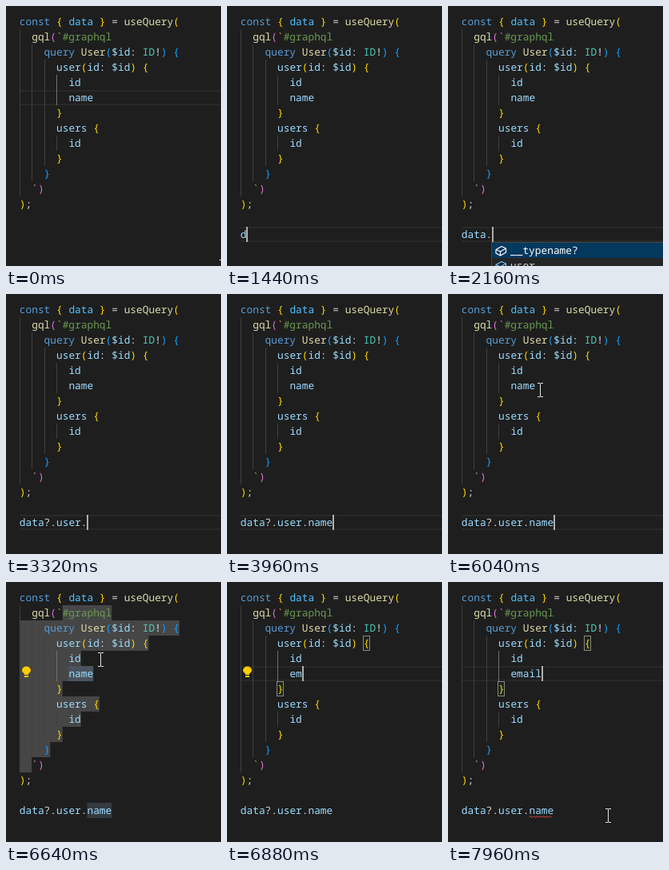
Recreate the animation shown at these times as an HTML page. Size 269 by 325 pixels, loop 8 s.

```html
<!DOCTYPE html>
<html lang="en">
<head>
<meta charset="utf-8">
<title>Typed query editor</title>
<style>
  html, body { margin: 0; width: 100%; height: 100%; overflow: hidden; background: #1e1e1e; }
  svg { display: block; width: 269px; height: 325px; }
  text { font: 12.83px "Noto Sans Mono", "DejaVu Sans Mono", monospace; white-space: pre; text-rendering: geometricPrecision; }
</style>
</head>
<body>
<svg id="stage" viewBox="0 0 269 325"></svg>
<script>
const LOOP = 8000, TICK = 40;
const LEFT = 16.8, TOP = 10, CHAR = 7.698, LINE = 19;
const color = {
  kw: '#569cd6', fn: '#dcdcaa', id: '#9cdcfe', con: '#4fc1ff', type: '#4ec9b0',
  str: '#ce9178', com: '#6a9955', op: '#d4d4d4',
  b1: '#ffd700', b2: '#da70d6', b3: '#179fff'
};

// Each line: indent, then pairs of colour and text
const code = [
  [0, 'kw', 'const ', 'b1', '{ ', 'con', 'data', 'b1', ' } ', 'op', '= ', 'fn', 'useQuery', 'b1', '('],
  [2, 'fn', 'gql', 'b2', '(', 'str', '`', 'com', '#graphql'],
  [4, 'kw', 'query ', 'fn', 'User', 'b3', '(', 'id', '$id', 'op', ': ', 'type', 'ID', 'op', '!', 'b3', ') {'],
  [6, 'id', 'user', 'b1', '(', 'id', 'id', 'op', ': ', 'id', '$id', 'b1', ') {'],
  [8, 'id', 'id'],
  [8, 'id', 'name'],
  [6, 'b1', '}'],
  [6, 'id', 'users ', 'b1', '{'],
  [8, 'id', 'id'],
  [6, 'b1', '}'],
  [4, 'b3', '}'],
  [2, 'str', '`', 'b2', ')'],
  [0, 'b1', ')', 'op', ';']
];

const typed = [
  [0, ''], [1440, 'd'], [1600, 'da'], [1680, 'dat'], [1800, 'data'], [2080, 'data.'],
  [2320, 'data.u'], [2480, 'data.us'], [2720, 'data?.user'], [3320, 'data?.user.'],
  [3560, 'data?.user.n'], [3680, 'data?.user.na'], [3880, 'data?.user.name']
];
const field = [
  [0, 'name'], [6760, 'e'], [6840, 'em'], [6960, 'ema'], [7080, 'emai'], [7240, 'email']
];
// Popup: time, column, entries
const popups = [
  [0], [1680, 1, ['data', 'DataView']], [2080],
  [2160, 5, ['__typename?', 'user']], [2320, 5, ['user', 'users']], [2720],
  [3360, 11, ['__typename?', 'id']], [3560, 11, ['name', '__typename?']], [3880]
];
const caretOff = [[0, 600], [1200, 1440], [4360, 4840], [5320, 5840], [6640, 6760]];
// Squiggles: from, to, first column, length
const errors = [
  [2400, 3000, 0, 4], [2800, 3120, 6, 4], [4080, 4320, 11, 4], [7400, LOOP, 11, 4]
];
const pointer = [
  [[0, 270.5, 325.5], [80, 258, 321], [240, 150, 302], [400, 50.5, 286.5], [760, 50.5, 286.5], [880, 245, 325], [920, 300, 350]],
  [[4640, 290, 332], [4880, 147.5, 276], [5080, 95, 257], [5320, 100.5, 258], [5560, 100.5, 258],
   [6040, 115.5, 120], [6160, 106, 116], [6360, 118.5, 97], [6760, 118.5, 97]],
  [[7760, 118.5, 97], [7880, 221, 212], [7960, 200.5, 292], [LOOP, 200.5, 292]]
];

const colX = c => LEFT + c * CHAR;
const lineY = n => TOP + n * LINE;
const within = (t, a, b) => t >= a && t < b;
const latest = (list, t) => list.filter(e => e[0] <= t).pop();
const rect = (x, y, w, h, fill, extra = '') =>
  `<rect x="${x}" y="${y}" width="${w}" height="${h}" fill="${fill}" ${extra}/>`;
const label = (x, y, fill, s) => `<text x="${x}" y="${y}" fill="${fill}">${s}</text>`;
const mark = (n, col, len, fill) => rect(colX(col), lineY(n), len * CHAR, LINE, fill);

function drawLine([indent, ...parts], n) {
  let out = '', col = indent;
  for (let i = 0; i < parts.length; i += 2) {
    out += label(colX(col), lineY(n) + 14, color[parts[i]], parts[i + 1]);
    col += parts[i + 1].length;
  }
  return out;
}

function lineLength([indent, ...parts]) {
  return parts.reduce((sum, s, i) => i % 2 ? sum + s.length : sum, indent);
}

function highlightTemplate() {
  let out = mark(1, 7, 8, '#575757b8');
  for (let n = 2; n <= 10; n++) out += mark(n, 0, lineLength(code[n]), '#575757b8');
  return out + mark(11, 0, 2, '#575757b8');
}

function guides(active) {
  let out = '';
  code.forEach(([indent], n) => {
    for (let c = 0; c < indent; c += 2) {
      const lit = active && c === 6 && (n === 4 || n === 5);
      out += rect(Math.round(colX(c)), lineY(n), 1, LINE, lit ? '#707070' : '#404040');
    }
  });
  return out;
}

function currentLine(n) {
  const y = lineY(n);
  return rect(17, y, 252, 2, '#282828') + rect(17, y + LINE - 2, 252, 2, '#282828');
}

function bracketBox(n, col) {
  return rect(Math.floor(colX(col)) + .5, lineY(n) + .5, 8, LINE - 1, '#0064001a', 'stroke="#888"');
}

function squiggle(col, len) {
  let d = `M${colX(col)} 294.5`;
  for (let x = 0; x < len * CHAR - 3; x += 4) d += 'l2 -2l2 2';
  return `<path d="${d}" fill="none" stroke="#f14c4c"/>`;
}

function cube(x, y, stroke) {
  return `<path transform="translate(${x} ${y})" d="M-6-1.5L1-5.5L6.5-3V2L-.5 6L-6 3ZM-6-1.5L-.5 1L6.5-3M-.5 1V6" fill="none" stroke="${stroke}" stroke-width="1.2" stroke-linejoin="round"/>`;
}

function popup(col, items) {
  const x = Math.floor(colX(col)) - 1;
  let out = rect(x + .5, 295.5, 430, 60, '#252526', 'stroke="#454545"');
  out += rect(x + 1, 296, 429, LINE, '#04395e');
  items.forEach((s, i) => {
    const y = 296 + i * LINE;
    out += cube(x + 12, y + 10, i ? '#75beff' : '#fff') + label(x + 24, y + 14, i ? '#d4d4d4' : '#fff', s);
  });
  return out;
}

const bulb = '<path d="M23 116v-1.5C21 113 20 112 20 110.500a5.500 5 0 0 1 11 0C31 112 30 113 28 114.500V116Z" fill="#ffcc00"/>' +
  rect(23, 117, 5, 2, '#ffcc00');

function drawPointer(t) {
  const path = pointer.find(p => within(t, p[0][0], p[p.length - 1][0]));
  if (!path) return '';
  const i = path.findIndex(p => p[0] > t);
  const [t0, x0, y0] = path[i - 1], [t1, x1, y1] = path[i];
  const k = (t - t0) / (t1 - t0);
  const x = Math.floor(x0 + (x1 - x0) * k) + .5, y = Math.round(y0 + (y1 - y0) * k);
  return `<path transform="translate(${x} ${y})" d="M-3.500-8.500H-.5L0-8L.5-8.500H3.500M0-8V8M-3.500 8.500H-.5L0 8L.5 8.500H3.500" fill="none" stroke="#e4e4e4"/>`;
}

function scene(t) {
  const text = latest(typed, t)[1], word = latest(field, t)[1];
  const below = within(t, 600, 6080);
  const selected = within(t, 6160, 6760);
  const list = latest(popups, t);
  let out = '';

  if (!selected) out += currentLine(below ? 14 : 5);
  if (selected) out += mark(5, 8, 4, '#264f78') + mark(14, 11, 4, '#add6ff26');
  if (within(t, 6480, 6760)) out += highlightTemplate();
  out += guides(!below);
  if (within(t, 6080, 6160) || t >= 6760) out += bracketBox(3, 20) + bracketBox(6, 6);

  code.forEach((line, n) => out += drawLine(n === 5 ? [8, 'id', word] : line, n));
  const parts = (text.match(/\w+|\W+/g) || []).flatMap(s => [/\w/.test(s) ? 'id' : 'op', s]);
  out += drawLine([0, ...parts], 14);

  for (const [a, b, col, len] of errors) if (within(t, a, b)) out += squiggle(col, len);
  if (within(t, 6480, 7480)) out += bulb;
  if (!caretOff.some(([a, b]) => within(t, a, b))) {
    const col = below ? text.length : 8 + word.length;
    out += rect(Math.floor(colX(col) + .3), lineY(below ? 14 : 5), 2, LINE, '#aeafad');
  }
  if (list[2]) out += popup(list[1], list[2]);
  return out + drawPointer(t);
}

const stage = document.getElementById('stage');
const start = performance.now();
let shown = -1;

function frame() {
  const t = Math.floor((performance.now() - start) % LOOP / TICK) * TICK;
  if (t !== shown) {
    stage.innerHTML = scene(t);
    shown = t;
  }
  requestAnimationFrame(frame);
}
frame();
</script>
</body>
</html>
```
